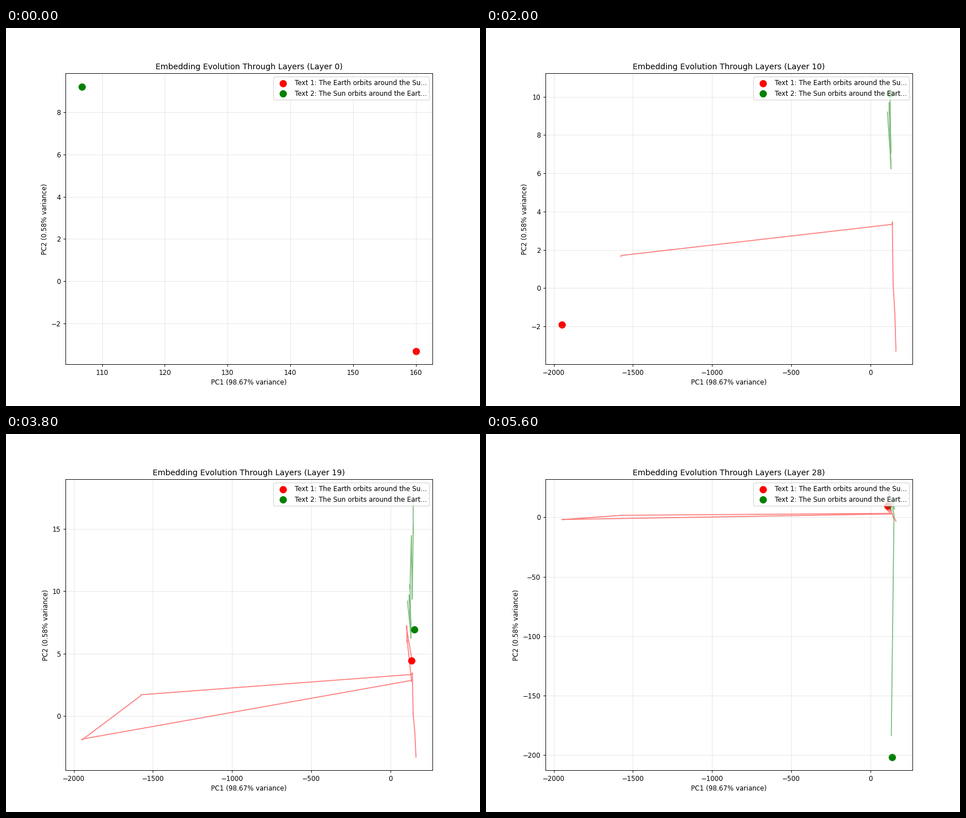
Animation, 837 px wide and 669 px high, one loop 5.8 s. Source, as a matplotlib script:

```python
import matplotlib.pyplot as plt
import numpy as np
from matplotlib.animation import FuncAnimation

WIDTH, HEIGHT = 837, 669
DPI = WIDTH / 10
STEP_MS = 200
LAYERS = np.arange(29)
SETTLE = 0.965  # PC2 shrinks by this factor right after a jump

# layer: (PC1, PC2) where a text lands after a jump
EARTH_JUMPS = {
    0: (160, -3.3), 2: (153.8, -1.45), 4: (142.4, 0.2), 6: (137.4, 3.45),
    8: (-1575, 1.7), 10: (-1948, -1.92), 12: (133, 2.85), 14: (104.5, 6.13),
    16: (101.5, 7.24), 18: (133.5, 4.6), 20: (116, 7.5), 24: (131, 5.9),
    28: (107, 9.7),
}
SUN_JUMPS = {
    0: (106.8, 9.2), 1: (128.7, 6.46), 3: (118, 9.51), 5: (118.6, 9.7),
    7: (127.9, 7.3), 9: (122.5, 10.53), 11: (131.5, 14.45), 13: (136.5, 9.68),
    15: (143.5, 15.17), 17: (142, 17.89), 19: (149.5, 6.91), 23: (116, 20.5),
    24: (115, 20.8), 25: (148, 2.5), 27: (131, -183.6), 28: (137, -201.7),
}


def trace(jumps):
    """Point for every layer: jump, settle, then drift to the next jump."""
    settled = {layer + 1: (x, y * SETTLE) for layer, (x, y) in jumps.items()}
    knots = sorted({**settled, **jumps}.items())
    at = [layer for layer, _ in knots]
    xs, ys = zip(*(point for _, point in knots))
    return np.column_stack([np.interp(LAYERS, at, xs),
                            np.interp(LAYERS, at, ys)])


TRACKS = [
    (trace(EARTH_JUMPS), "red", "Text 1: The Earth orbits around the Su..."),
    (trace(SUN_JUMPS), "green", "Text 2: The Sun orbits around the Eart..."),
]

# the small excess keeps the pixel size from rounding down
fig, ax = plt.subplots(
    figsize=((WIDTH + 0.01) / DPI, (HEIGHT + 0.01) / DPI), dpi=DPI)


def draw_layer(layer):
    ax.clear()
    for points, color, label in TRACKS:
        # the trail stops at the previous layer
        if layer:
            ax.plot(*points[:layer].T, color=color, alpha=0.5)
        ax.scatter(*points[layer], color=color, s=100, label=label)
    ax.set_title(f"Embedding Evolution Through Layers (Layer {layer})")
    ax.set_xlabel("PC1 (98.67% variance)")
    ax.set_ylabel("PC2 (0.58% variance)")
    ax.grid(True, alpha=0.3)
    ax.legend(loc="upper right")


anim = FuncAnimation(fig, draw_layer, frames=len(LAYERS),
                     interval=STEP_MS, repeat=True, repeat_delay=0)
plt.show()
```
